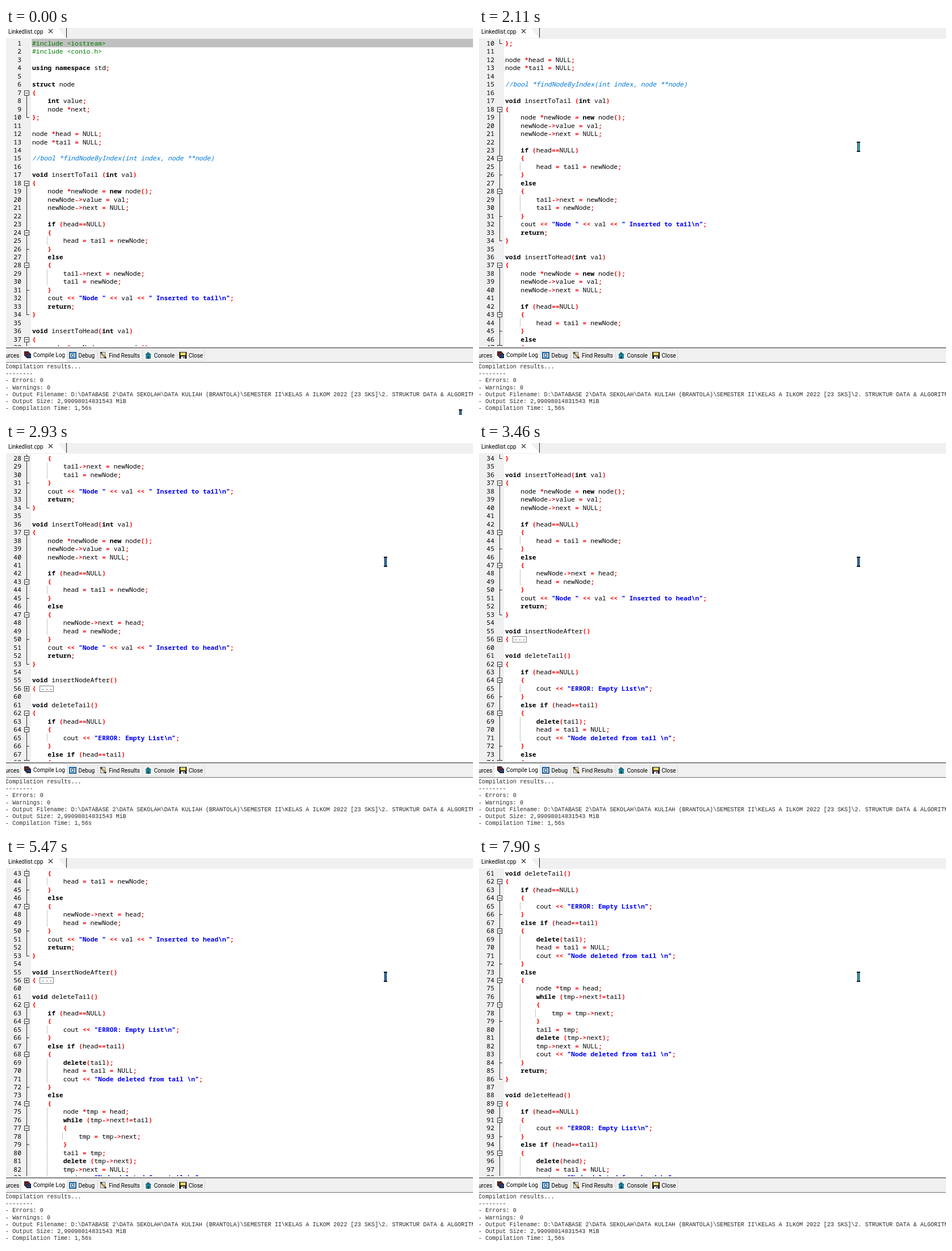
These frames come from a looping animation (822x681 px, 8 s). An HTML page with a canvas:

```html
<!DOCTYPE html>
<html lang="en">
<head>
<meta charset="utf-8">
<title>Code editor</title>
<style>
html, body { margin: 0; width: 100%; height: 100%; overflow: hidden; background: #fff; }
canvas { display: block; }
</style>
</head>
<body>
<canvas id="stage" width="822" height="681"></canvas>
<script>
const ctx = document.getElementById('stage').getContext('2d');
const LOOP = 8000;
const CODE_X = 46, CHAR_W = 6.83, ROW_H = 14.46, ROW_MID = 27, FOLD_X = 36;
const CODE_FONT = '11.38px "Noto Sans Mono", monospace';
const UI_FONT = '10px Roboto, sans-serif';
const LOG_FONT = '10.13px "Liberation Mono", monospace';

const source = String.raw`#include <iostream>
#include <conio.h>

using namespace std;

struct node
{
    int value;
    node *next;
};

node *head = NULL;
node *tail = NULL;

//bool *findNodeByIndex(int index, node **node)

void insertToTail (int val)
{
    node *newNode = new node();
    newNode->value = val;
    newNode->next = NULL;

    if (head==NULL)
    {
        head = tail = newNode;
    }
    else
    {
        tail->next = newNode;
        tail = newNode;
    }
    cout << "Node " << val << " Inserted to tail\n";
    return;
}

void insertToHead(int val)
{
    node *newNode = new node();
    newNode->value = val;
    newNode->next = NULL;

    if (head==NULL)
    {
        head = tail = newNode;
    }
    else
    {
        newNode->next = head;
        head = newNode;
    }
    cout << "Node " << val << " Inserted to head\n";
    return;
}

void insertNodeAfter()
{ ...

void deleteTail()
{
    if (head==NULL)
    {
        cout << "ERROR: Empty List\n";
    }
    else if (head==tail)
    {
        delete(tail);
        head = tail = NULL;
        cout << "Node deleted from tail \n";
    }
    else
    {
        node *tmp = head;
        while (tmp->next!=tail)
        {
            tmp = tmp->next;
        }
        tail = tmp;
        delete (tmp->next);
        tmp->next = NULL;
        cout << "Node deleted from tail \n";
    }
    return;
}

void deleteHead()
{
    if (head==NULL)
    {
        cout << "ERROR: Empty List\n";
    }
    else if (head==tail)
    {
        delete(head);
        head = tail = NULL;
        cout << "Node deleted from head \n";`;

const TOKEN = /(^#.*|^\/\/.*)|("[^"]*")|\b(using|namespace|struct|int|void|new|if|else|return|delete|while)\b|([{}()\[\];*=<>!,&-]+)|(\w+)/g;

function tokenize(text) {
  return [...text.matchAll(TOKEN)].map(m => {
    const [word, line, string, keyword, symbol] = m;
    const style = line ? (word[0] === '#' ? ['', '#007a00'] : ['italic ', '#0078d7'])
      : string ? ['bold ', '#0000f0']
      : keyword ? ['bold ', '#000']
      : symbol ? ['bold ', '#ff0000'] : ['', '#000'];
    return { word, col: m.index, weight: style[0], color: style[1] };
  });
}

let depth = 0;
const rows = source.split('\n').map((text, i) => {
  const body = text.trim();
  const folded = body === '{ ...';
  const before = depth;
  if (body === '{') depth++;
  if (body[0] === '}') depth--;
  return {
    number: i < 56 ? i + 1 : i + 4,
    tokens: tokenize(folded ? '{' : text),
    indent: text.search(/\S/),
    open: body === '{', close: body[0] === '}', folded, before, after: depth
  };
});

// Moments at which the wheel moves the view down three lines
const wheel = [1770, 1900, 2030, 2120, 2250, 2590, 2660, 2800, 2930, 3060, 3200,
  5260, 5330, 5400, 5530, 5600, 5670, 5800, 5900];

function rect(color, x, y, w, h) {
  ctx.fillStyle = color;
  ctx.fillRect(x, y, w, h);
}

function frame(color, x, y, w, h) {
  ctx.strokeStyle = color;
  ctx.lineWidth = 1;
  ctx.strokeRect(x + .5, y + .5, w - 1, h - 1);
}

function poly(color, ...points) {
  ctx.fillStyle = color;
  ctx.beginPath();
  points.forEach(([x, y]) => ctx.lineTo(x, y));
  ctx.fill();
}

function text(str, x, y, font, color = '#000', align = 'left') {
  ctx.font = font;
  ctx.fillStyle = color;
  ctx.textAlign = align;
  ctx.fillText(str, x, y);
}

function drawFold(row, y) {
  const mid = Math.round(y), top = Math.round(y - ROW_H / 2), bottom = Math.round(y + ROW_H / 2);
  const ink = '#303030';
  if (row.before) rect(ink, FOLD_X, top, 1, (row.after ? bottom : mid) - top);
  if (row.close) rect(ink, FOLD_X, mid, 5, 1);
  if (!row.open && !row.folded) return;
  if (row.open) rect(ink, FOLD_X, mid, 1, bottom - mid);
  rect('#fff', FOLD_X - 4, mid - 4, 9, 9);
  frame(ink, FOLD_X - 4, mid - 4, 9, 9);
  rect(ink, FOLD_X - 2, mid, 5, 1);
  if (row.folded) rect(ink, FOLD_X, mid - 2, 1, 5);
}

function drawRow(row, y) {
  text(row.number, 27, y + 4, CODE_FONT, '#000', 'right');
  drawFold(row, y);
  for (let col = 4; col < row.indent; col += 4)
    rect('#c4c4c4', Math.floor(CODE_X + col * CHAR_W) - 1, y - ROW_H / 2, 1, ROW_H);
  for (const t of row.tokens)
    text(t.word, CODE_X + t.col * CHAR_W, y + 4, t.weight + CODE_FONT, t.color);
  if (row.folded) {
    const mid = Math.round(y);
    frame('#808080', 59, mid - 5, 25, 11);
    for (let x = 64; x < 80; x += 7) rect('#404040', x, mid + 1, 2, 1);
  }
}

function drawEditor(t) {
  const first = 3 * wheel.filter(at => at <= t).length;
  ctx.save();
  ctx.beginPath();
  ctx.rect(0, 19, 822, 541);
  ctx.clip();
  rect('#fff', 0, 19, 822, 541);
  rect('#f0f0f0', 0, 19, 44, 541);
  if (first === 0) rect('#c0c0c0', 45, 19, 777, 15);
  rows.slice(first, first + 38).forEach((row, i) => drawRow(row, ROW_MID + i * ROW_H));
  ctx.restore();
}

function drawFileTab() {
  rect('#f0f0f0', 0, 0, 822, 19);
  poly('#fff', [0, 0], [92, 0], [97, 8], [105, 16], [105, 18], [0, 18]);
  rect('#202020', 106, 0, 1, 17);
  text('Linkedlist.cpp', 4, 9.5, UI_FONT);
  ctx.strokeStyle = '#303030';
  ctx.lineWidth = 1.1;
  ctx.beginPath();
  ctx.moveTo(75, 2); ctx.lineTo(82, 9);
  ctx.moveTo(82, 2); ctx.lineTo(75, 9);
  ctx.stroke();
}

const icons = {
  stack() {
    [['#a02030', 32, 569], ['#c03040', 34, 571], ['#204080', 36, 573]].forEach(([color, x, y]) => {
      rect(color, x, y, 8, 8);
      frame('#181818', x, y, 8, 8);
    });
  },
  debug() {
    rect('#1c5f9c', 111, 570, 13, 12);
    rect('#cfe8f8', 113, 572, 9, 8);
    frame('#123c66', 115, 573, 5, 6);
  },
  find() {
    rect('#e8e8e0', 166, 570, 9, 11);
    frame('#707070', 166, 570, 9, 11);
    poly('#303030', [165, 571], [168, 570], [177, 580], [175, 582]);
    poly('#d8b040', [168, 573], [170, 572], [175, 578], [173, 579]);
  },
  console() {
    poly('#176c80', [245, 575], [250, 570], [256, 575]);
    rect('#248ba0', 246, 575, 9, 7);
    rect('#10485c', 249, 577, 3, 5);
  },
  close() {
    rect('#202020', 305, 570, 13, 12);
    rect('#f0d860', 307, 571, 9, 5);
    rect('#f4f4f4', 308, 578, 7, 4);
    rect('#202020', 312, 579, 2, 2);
  }
};

function drawPanelTabs() {
  rect('#f0f0f0', 0, 560, 822, 29);
  rect('#fff', 0, 560, 822, 1);
  rect('#707070', 0, 562, 822, 1);
  rect('#a8a8a8', 0, 563, 822, 1);
  rect('#fff', 27, 565, 80, 23);
  for (const x of [26, 107, 161, 240, 301, 349]) rect('#d8d8d8', x, 567, 1, 18);
  rect('#e6e6e6', 107, 567, 242, 1);
  rect('#e6e6e6', 107, 585, 242, 1);
  rect('#707070', 0, 588, 822, 1);
  Object.values(icons).forEach(draw => draw());
  text('urces', -1, 580, UI_FONT);
  text('Compile Log', 48, 578.5, UI_FONT);
  text('Debug', 127.5, 580, UI_FONT);
  text('Find Results', 181, 580, UI_FONT);
  text('Console', 260.5, 580, UI_FONT);
  text('Close', 321.5, 580, UI_FONT);
}

const log = String.raw`Compilation results...
--------
- Errors: 0
- Warnings: 0
- Output Filename: D:\DATABASE 2\DATA SEKOLAH\DATA KULIAH (BRANTOLA)\SEMESTER II\KELAS A ILKOM 2022 [23 SKS]\2. STRUKTUR DATA & ALGORITMA
- Output Size: 2,99098014831543 MiB
- Compilation Time: 1,56s`.split('\n');

function drawLog() {
  rect('#fff', 0, 589, 822, 92);
  log.forEach((line, i) => text(line, -1, 599 + i * 12.17, LOG_FONT, '#282828'));
}

const ease = (t, from, to) => {
  const k = Math.min(1, Math.max(0, (t - from) / (to - from)));
  return k * k * (3 - 2 * k);
};

function drawPointer(t) {
  const sweep = ease(t, 30, 830), settle = ease(t, 830, 1000);
  const x = Math.round(797 - 140 * sweep + 8 * settle);
  const y = Math.round(671 - 469 * sweep - 2 * settle);
  // The stem colour pulses between blue and cyan
  const pulse = Math.cos(2 * Math.PI * ((t - 2320) / 546 + .06));
  const blue = Math.min(1, Math.max(0, .5 + pulse * 1.5));
  const mix = (a, b) => Math.round(a + (b - a) * blue);
  const ink = '#101820';
  rect(ink, x, y, 6, 2);
  rect(ink, x, y + 16, 6, 2);
  rect(ink, x + 1, y + 2, 4, 14);
  rect(`rgb(${mix(0, 20)},${mix(205, 130)},${mix(225, 215)})`, x + 2, y + 2, 2, 14);
}

function draw(now) {
  const t = now % LOOP;
  drawEditor(t);
  drawFileTab();
  drawPanelTabs();
  drawLog();
  drawPointer(t);
  requestAnimationFrame(draw);
}
requestAnimationFrame(draw);
</script>
</body>
</html>
```
